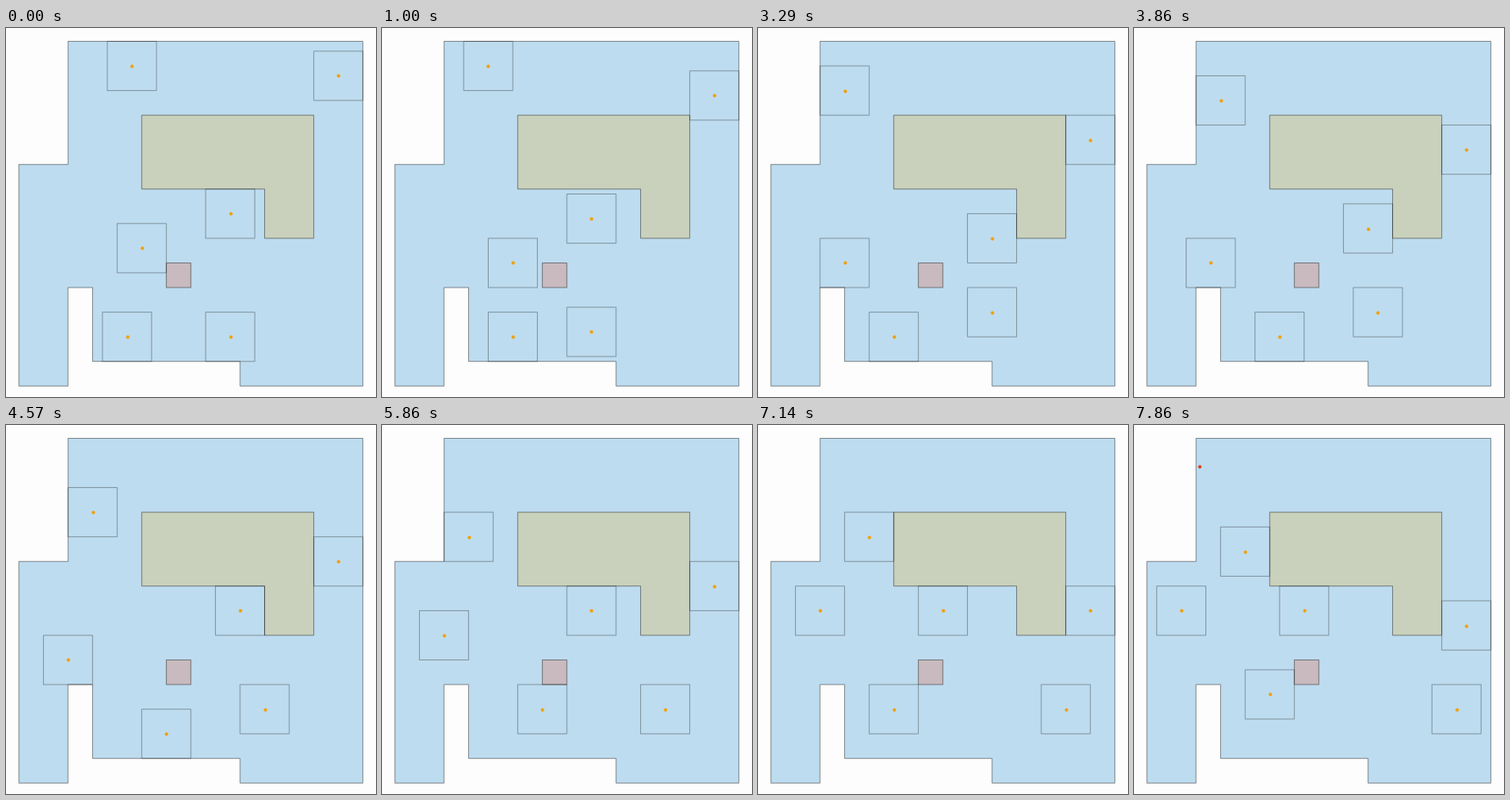
Animation, 430 px wide and 428 px high, one loop 8 s. Source, as a matplotlib script:

```python
from itertools import cycle
from math import ceil

import matplotlib.pyplot as plt
from matplotlib.animation import FuncAnimation
from matplotlib.patches import Polygon, Rectangle

W, H = 430, 428
LOOP, INTERVAL = 8000, 20   # ms
TICK = 1000 / 7             # the picture changes seven times a second
CELL, X0, Y0 = 28.56, 14.95, 15.45
PX = 0.72                   # points per pixel at 100 dpi
SEGMENT, LEAD = 9, 4        # ticks per cell, ticks already spent at the start

MOVES = {"L": (-1, 0), "R": (1, 0), "U": (0, -1), "D": (0, 1)}
WALKS = [  # start cell, then one move per segment
    ((5, 1), "LLDDDRD"),
    ((13, 1), "DDDDDDD"),
    ((9, 7), "LDRULLL"),
    ((5, 8), "DLLLUUL"),
    ((4, 12), "RLRRULU"),
    ((9, 12), "LURRRRR"),
]

# A red point flashes for one tick at a steady beat
FLASH_START, FLASH_GAP = 22, 6.6
FLASH_CELLS = [(.2, 9), (11.5, 13.25), (8, 1.6), (12.5, 2), (.4, 13.9), (2.14, 1.13)]


def to_px(x, y):
    return X0 + x * CELL, Y0 + y * CELL


def outline(x, y, steps):
    """Corners of a shape whose sides run across and down in turn."""
    corners = [to_px(x, y)]
    for step, across in zip(steps, cycle((True, False))):
        x, y = (x + step, y) if across else (x, y + step)
        corners.append(to_px(x, y))
    return corners


def position(start, moves, tick):
    seg, step = divmod(tick + LEAD, SEGMENT)
    part = min(round(step * 10 / SEGMENT), 8) / 10   # waits before the last jump
    x, y = start
    for i, move in enumerate(moves[:seg + 1]):
        dx, dy = MOVES[move]
        share = part if i == seg else 1
        x, y = x + share * dx, y + share * dy
    return x, y


fig = plt.figure(figsize=(W / 100, H / 100), dpi=100, facecolor="#fdfdfd")
ax = fig.add_axes([0, 0, 1, 1])
ax.set_xlim(0, W)
ax.set_ylim(H, 0)
ax.axis("off")


def add_shape(x, y, steps, color):
    ax.add_patch(Polygon(outline(x, y, steps), facecolor=color, lw=PX,
                         edgecolor=(0, 0, 0, .42), joinstyle="miter", snap=False))


def add_dots(color, z):
    return ax.plot([], [], "o", color=color, ms=4 * PX, mew=0, zorder=z)[0]


add_shape(2, 0, [12, 14, -5, -1, -6, -3, -1, 4, -2, -9, 2], "#bedcef")
add_shape(5, 3, [7, 5, -2, -2, -5], "#c9d1bc")
add_shape(6, 9, [1, 1, -1], "#c8babe")

boxes = [ax.add_patch(Rectangle((0, 0), 2 * CELL, 2 * CELL, fill=False, lw=PX,
                                edgecolor=(0, 0, 0, .32), snap=False))
         for _ in WALKS]
dots = add_dots("#eda20f", 3)
flash = add_dots("#d8431c", 4)
flashes = {ceil(FLASH_START + FLASH_GAP * i): cell
           for i, cell in enumerate(FLASH_CELLS)}


def draw(frame):
    # Count a tick that begins within this frame as begun
    tick = int(((frame + 1) * INTERVAL - 1) / TICK)
    spots = [position(start, moves, tick) for start, moves in WALKS]
    for box, (x, y) in zip(boxes, spots):
        box.set_xy(to_px(x - 1, y - 1))
    dots.set_data(*zip(*(to_px(*s) for s in spots)))
    hit = [to_px(*flashes[tick])] if tick in flashes else []
    flash.set_data([p[0] for p in hit], [p[1] for p in hit])
    return [*boxes, dots, flash]


anim = FuncAnimation(fig, draw, frames=LOOP // INTERVAL, interval=INTERVAL,
                     repeat=True, repeat_delay=0, blit=False)
plt.show()
```
